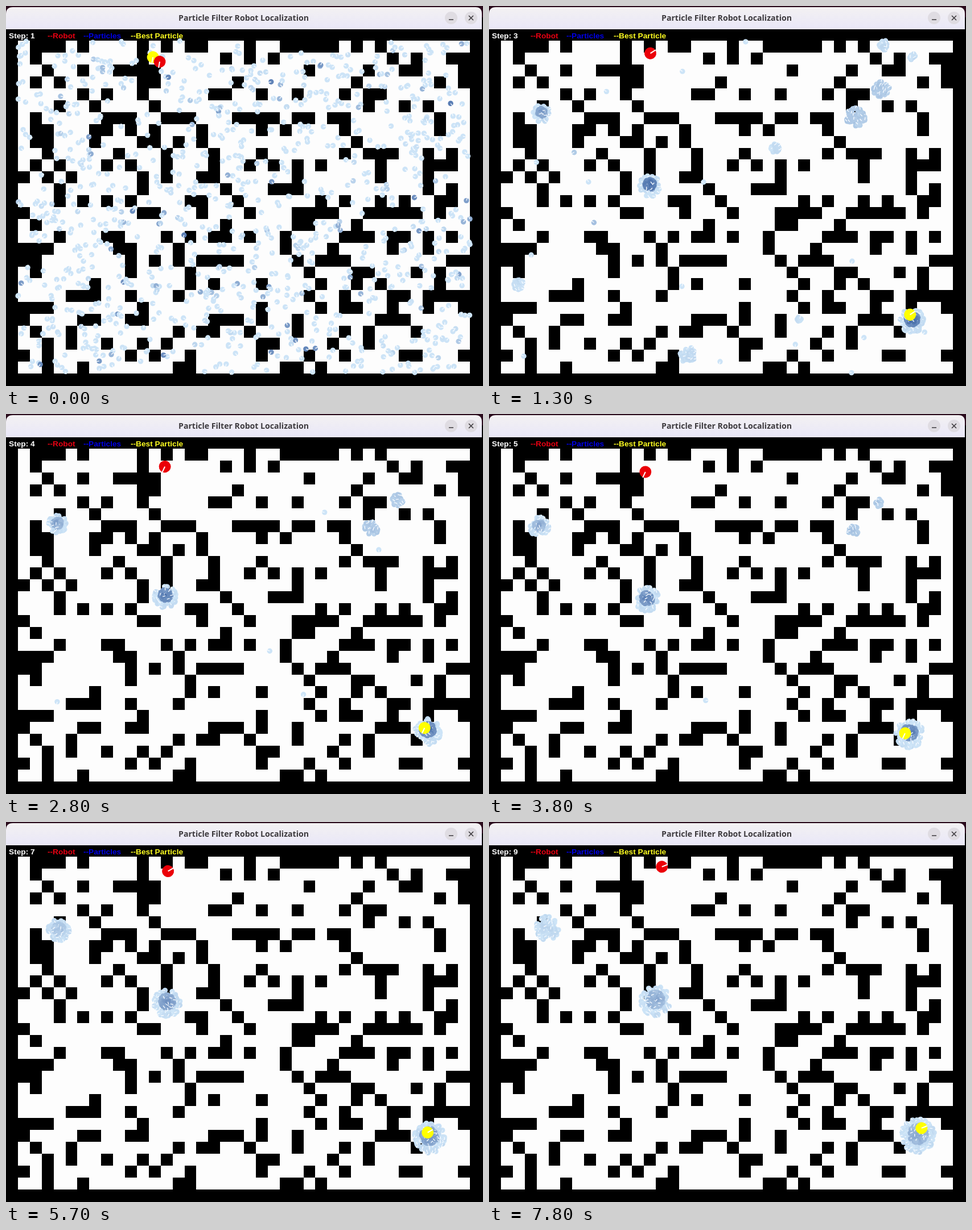
An HTML page with a canvas that plays this animation: 838 by 669 pixels, repeating every 8000 ms.

```html
<!DOCTYPE html>
<html lang="en">
<head>
<meta charset="utf-8">
<title>Particle Filter Robot Localization</title>
<style>
html, body { margin: 0; width: 838px; height: 669px; overflow: hidden; background: #000; }
canvas, svg { position: absolute; left: 0; top: 0; display: block; }
.hud { font: bold 13.7px "Liberation Sans", Arial, sans-serif; }
.bar { font: bold 14.1px "Open Sans", "Noto Sans", sans-serif; }
</style>
</head>
<body>
<canvas id="field" width="838" height="669"></canvas>
<svg width="838" height="669" viewBox="0 0 838 669">
  <defs>
    <linearGradient id="sky" x2="0" y2="1">
      <stop offset="0" stop-color="#f3f1f2"/>
      <stop offset="1" stop-color="#e9e7f8"/>
    </linearGradient>
  </defs>
  <rect width="838" height="20" fill="#2a0b1c"/>
  <path d="M0 41V14Q0 2 12 2H825Q836 2 836 14V41Z" fill="url(#sky)"/>
  <text class="bar" x="417.5" y="25.5" text-anchor="middle" fill="#3d3a3e">Particle Filter Robot Localization</text>
  <g fill="#dfdce2"><circle cx="782" cy="21" r="11"/><circle cx="817" cy="21" r="11"/></g>
  <path d="M778 24h8M813 17l8 8M821 17l-8 8" stroke="#3d3a3e" stroke-width="1.6" fill="none"/>
  <g class="hud">
    <text id="step" x="5" y="57" fill="#fff"></text>
    <text x="73" y="57" fill="#e60012">--Robot</text>
    <text x="136" y="57" fill="#0000e6">--Particles</text>
    <text x="219" y="57" fill="#ffff20">--Best Particle</text>
  </g>
  <g id="best"><circle r="10.5" fill="#ffff00"/><path d="M0 0H10.5" stroke="#fff" stroke-width="2"/></g>
  <g id="robot"><circle r="10.5" fill="#eb0008"/><path d="M0 0H11" stroke="#fff" stroke-width="2"/></g>
</svg>
<script>
const maze = `
.###.#....#.#.##...#..#####.#.#.......
.#........#......#.#.#.........#.#..##
..#..#..####............#....#..##...#
.#.#......##......#.........#......#.#
.....#.#..#.....##..#..#...#.##.......
...#..#....#.................#..#.#...
.#.....###..###...####.##.##.......#..
.##...##.#.#...#....#.#....#.......#..
.##...#...##.#.#............#.........
..#.....#...#...#...#......#.###..#.#.
.#.#...#.#..#...#..#.#.#.#....#...###.
#.#.#.....#.#..##......#......#...#...
...#......#......#...###..........#.#.
...#.#.#.#....##..#......#.#..#.#..##.
#.........##...#...#...####..#####.#..
.#...............#.....##...#.........
...#...##...#.#.##.#..#....###.##.#.#.
###.....##...#........#...#....#..#...
##.......#.#.#.####....#.###........##
.#.......#....#.........#...##...#.#..
......#.......#.#...#....#..#.#....#..
....###..#...#..........#..#...##.####
###.......#.........#....#.##..#..#..#
#....##..##.....###.#..#......###.....
.#..#........#.##..#...#...#.#...#....
..#.#..#..#.#.......##....#..#........
#.#......#.#..#.....#...#..#....##...#
..#..#.......##.......##.#............`.trim().split("\n");

const cell = 20.9, top0 = 40.5, turn = Math.PI * 2;

// Guesses of the robot's place as x, y, radius, grouped by how long they survive.
const lasting = [[88, 192, 21], [278, 320, 25], [739, 557, 28]];
const fading = [[685, 150, 18], [640, 199, 21]];
const brief = [[499, 253, 17], [740, 92, 14], [690, 72, 18], [48, 493, 19], [540, 555, 12], [345, 618, 27]];
const early = [[255, 93, 13], [138, 137, 16], [187, 178, 15], [541, 96, 14], [638, 122, 17],
  [655, 132, 15], [462, 253, 14], [258, 146, 11], [241, 341, 17], [431, 341, 13], [338, 428, 17],
  [368, 426, 17], [505, 426, 12], [640, 443, 19], [672, 490, 13], [212, 491, 12], [142, 532, 15],
  [145, 620, 17], [165, 643, 13], [685, 604, 15]];

// The robot turns to each heading and then drives one stride.
const headings = [100, -62, -33, 115, 115, -85, -30, -22, -22];
const stride = 10.3;
const path = [{ x: 270, y: 98 }];
for (const heading of headings.slice(1)) {
  const last = path.at(-1), a = heading * turn / 360;
  path.push({ x: last.x + stride * Math.cos(a), y: last.y + stride * Math.sin(a) });
}

const ctx = document.getElementById("field").getContext("2d");
const byId = id => document.getElementById(id);
let rnd;

function random(seed) {
  return () => {
    seed = seed + 0x6d2b79f5 | 0;
    let t = Math.imul(seed ^ seed >>> 15, 1 | seed);
    t = t + Math.imul(t ^ t >>> 7, 61 | t) ^ t;
    return ((t ^ t >>> 14) >>> 0) / 4294967296;
  };
}

function isFree(x, y) {
  const row = maze[Math.floor((y - top0) / cell) - 1];
  return !!row && row[Math.floor(x / cell) - 1] === ".";
}

function drawMaze() {
  ctx.fillStyle = "#000";
  ctx.fillRect(0, 0, 838, 669);
  ctx.fillStyle = "#fdfdfd";
  const edge = (i, start) => Math.round(start + i * cell);
  maze.forEach((row, r) => [...row].forEach((c, k) => {
    if (c !== ".") return;
    const x = edge(k + 1, 0), y = edge(r + 1, top0);
    ctx.fillRect(x, y, edge(k + 2, 0) - x, edge(r + 2, top0) - y);
  }));
}

function dot(x, y, angle, shade) {
  const s = Math.max(0, Math.min(1, shade));
  const mix = (a, b) => Math.round(a + (b - a) * s);
  ctx.fillStyle = `rgb(${mix(205, 38)},${mix(228, 80)},${mix(247, 150)})`;
  ctx.beginPath();
  ctx.arc(x, y, 4.7, 0, turn);
  ctx.fill();
  ctx.beginPath();
  ctx.moveTo(x, y);
  ctx.lineTo(x + 5 * Math.cos(angle), y + 5 * Math.sin(angle));
  ctx.stroke();
}

function scatter(count) {
  while (count > 0) {
    const x = 20 + rnd() * 797, y = 60 + rnd() * 587;
    if (!isFree(x, y)) continue;
    dot(x, y, rnd() * turn, rnd() ** 20 * .7);
    count--;
  }
}

function clump(x, y, radius, shade, density = .12) {
  const aim = rnd() * turn, reach = Math.max(3, radius - 4);
  for (let n = 2 + radius * radius * density; n > 0; n--) {
    const a = rnd() * turn, r = Math.sqrt(rnd());
    dot(x + reach * r * Math.cos(a), y + reach * r * Math.sin(a),
      aim + (rnd() - .5) * 1.6, shade * (1.15 - .4 * r) + (rnd() - .5) * .1);
  }
}

// Each step drops weak guesses; the strong ones grow wider and paler.
function drawParticles(step, dx, dy) {
  ctx.strokeStyle = "#f7fbff";
  ctx.lineWidth = 1.4;
  if (step === 1) return scatter(950);
  scatter(Math.floor(55 * 3.2 ** (2 - step)));
  const group = (list, scale, shade) => list.forEach(([x, y, r]) =>
    clump(x + dx / 2, y + dy / 2, r * scale, shade));
  if (step < 3) group(early, 1, .04);
  if (step < 4) group(brief, step < 3 ? 1 : .7, .04);
  if (step < 7) group(fading, Math.min(1, 1.6 - step / 5), .2);
  const grow = step < 3 ? .4 : .75 + step / 20;
  group(lasting, grow, .04);
  lasting.forEach(([x, y, r], i) =>
    clump(x + dx / 2, y + dy / 2 - r * .1, r * grow * .58, (i ? 1 : .7) - .07 * step, .36));
}

function place(id, x, y, angle) {
  byId(id).setAttribute("transform", `translate(${x} ${y}) rotate(${angle})`);
}

function bestHome(step) {
  if (step === 1) return [263, 81];
  return step === 6 ? [274, 310] : [731, 549];
}

let shown = -1;
function render(ms) {
  // Every step redraws twice: after moving and after resampling.
  const phase = Math.max(0, 1 + Math.floor((ms % 8000 - 100) / 502));
  if (phase === shown) return;
  shown = phase;
  const step = 1 + Math.ceil(phase / 2);
  const { x, y } = path[step - 1], heading = headings[step - 1];
  const dx = x - path[1].x, dy = y - path[1].y;
  const [bx, by] = bestHome(step);
  rnd = random(11 + phase);
  drawMaze();
  drawParticles(step, dx, dy);
  byId("step").textContent = "Step: " + step;
  place("best", bx + dx, by + dy, heading);
  place("robot", x, y, heading);
}

const began = performance.now();
function tick() {
  render(Math.max(0, performance.now() - began));
  requestAnimationFrame(tick);
}
tick();
</script>
</body>
</html>
```
